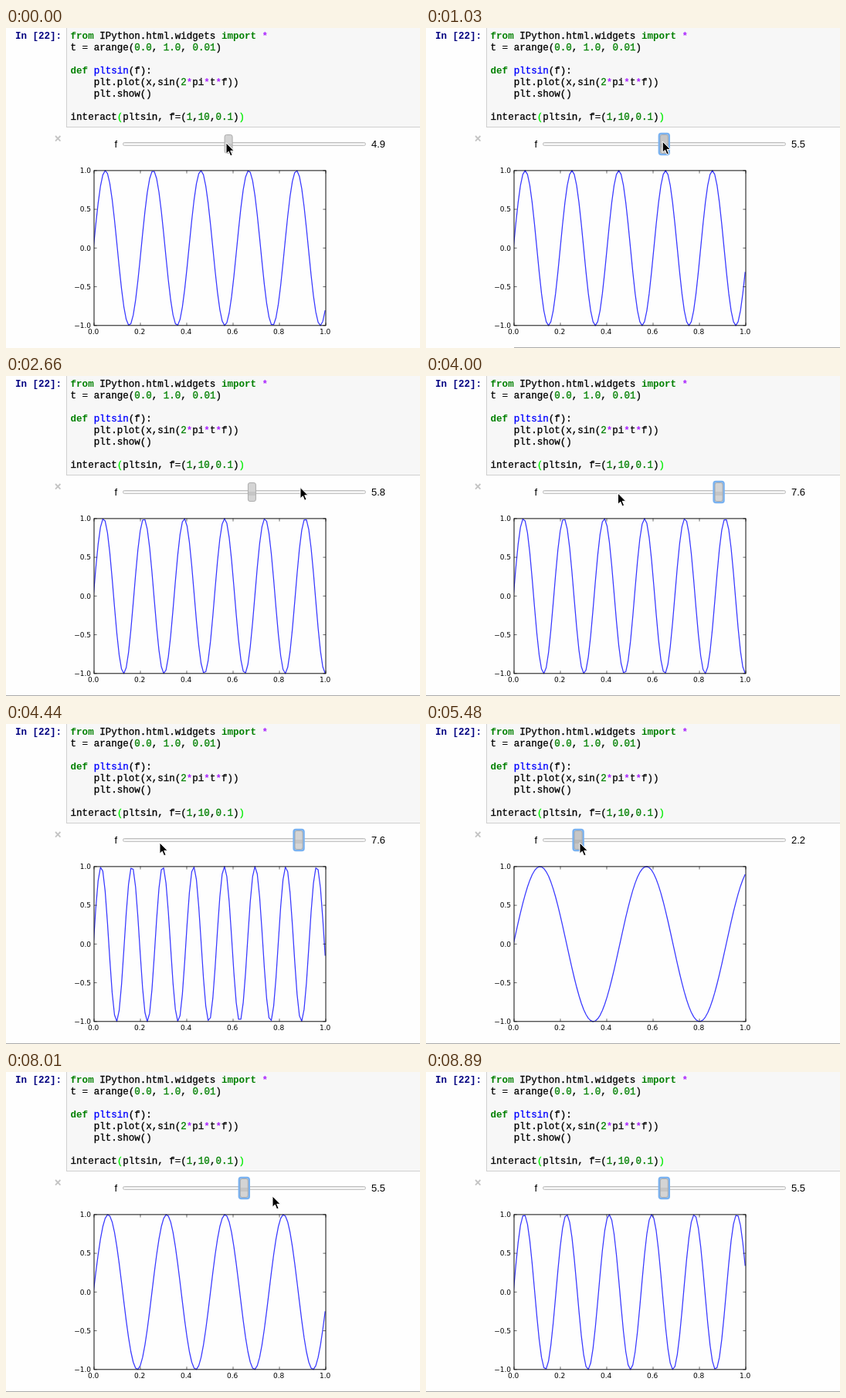
Write an HTML page that moves like this. It is 536 px wide and 415 px high and loops after 9.53 s.

```html
<!DOCTYPE html>
<html lang="en">
<head>
<meta charset="utf-8">
<title>Interactive sine plot</title>
<style>
  html, body { margin: 0; width: 100%; height: 100%; overflow: hidden; background: #fff; }
  #stage { position: relative; width: 536px; height: 415px; overflow: hidden; background: #fefefe; }
  .cell { position: absolute; left: 78px; top: -10px; width: 480px; height: 137px;
    background: #f7f7f7; border: 1px solid #cfcfcf; }
  pre { position: absolute; margin: 0; top: 4px; color: #000;
    font: 12.53px/15px "Liberation Mono", "Courier New", monospace; }
  #prompt { left: 12px; color: #000080; font-weight: bold; }
  #code { left: 83.6px; -webkit-text-stroke: .3px currentColor; }
  #code .k, #code .o { font-weight: bold; -webkit-text-stroke: 0; }
  .k { color: #008000; }
  .n { color: #008000; }
  .o { color: #a2f; }
  .d { color: #00f; }
  .b { color: #0e0; }
  svg { position: absolute; left: 0; top: 0; }
  .ui { font: 13px "Liberation Sans", Arial, sans-serif; }
  .tick { font: 9px "DejaVu Sans", sans-serif; }
</style>
</head>
<body>
<div id="stage">
  <div class="cell"></div>
  <pre id="prompt">In [22]:</pre>
  <pre id="code"><span class="k">from</span> IPython.html.widgets <span class="k">import</span> <span class="o">*</span>
t = arange(<span class="n">0.0</span>, <span class="n">1.0</span>, <span class="n">0.01</span>)

<span class="k">def</span> <span class="d">pltsin</span>(f):
    plt.plot(x,sin(<span class="n">2</span><span class="o">*</span>pi<span class="o">*</span>t<span class="o">*</span>f))
    plt.show()

interact<span class="b">(</span>pltsin, f=(<span class="n">1</span>,<span class="n">10</span>,<span class="n">0.1</span>)<span class="b">)</span></pre>
  <svg width="536" height="415" viewBox="0 0 536 415">
    <defs>
      <linearGradient id="track" x1="0" y1="0" x2="0" y2="1">
        <stop offset="0" stop-color="#e4e4e4"/><stop offset="1" stop-color="#fff"/>
      </linearGradient>
      <clipPath id="inside"><rect x="114" y="184" width="301" height="203"/></clipPath>
    </defs>
    <path d="M64 140l6.4 6.6M70.4 140l-6.4 6.6" stroke="#c4c4c4" stroke-width="1.8"/>
    <text class="ui" x="140.5" y="155">f</text>
    <text class="ui" id="value" x="473" y="155"></text>
    <rect x="151.5" y="148.5" width="314" height="4" rx="2" fill="url(#track)" stroke="#bdbdbd"/>
    <g clip-path="url(#inside)">
      <path id="curve" transform="translate(-.8)" fill="none" stroke="#3838ff" stroke-width="1.25" stroke-linejoin="round"/>
    </g>
    <g id="axes"></g>
    <path id="rule" stroke="#ababab"/>
    <g id="thumb">
      <rect id="glow" x="-6.4" y="137" width="12.8" height="27" rx="2.5" fill="#b9d7f5" stroke="#7ab2f0" stroke-width="2.6"/>
      <rect id="knob" x="-5" y="138.5" width="10" height="24" rx="2.5" stroke="#acacac"/>
      <rect x="-4.5" y="150" width="9" height="5" opacity=".07"/>
    </g>
    <path id="cursor" d="M0 0V14.2L3.3 11.2L5.6 16.8L8.1 15.7L5.7 10.3H10.2Z" stroke="#fff"/>
  </svg>
</div>
<script>
const LOOP = 9530, TICK = 148.2;
const LATENCY = 4, REDRAW = 3;    // ticks until a new value reaches the plot
const BOX = { x: 114, y: 184.9, w: 300, h: 200.9 };
const $ = id => document.getElementById(id);

// The user's actions in ticks: x, y move the pointer, f sets the slider.
const begin = { x: 285, y: 149, f: 4.9 };
const script = [
  { at: 2, len: 8, x: 319, y: 146, f: 5.8 },
  { at: 14, len: 4, x: 381, y: 144.5 },
  { at: 20, len: 1, x: 381, y: 149 },
  { at: 23, len: 1, f: 7.6 },
  { at: 25, len: 2, x: 248.5, y: 152 },
  { at: 27, len: 3, x: 199, y: 154 },
  { at: 32, len: 1, f: 2.2 },
  { at: 37, len: 7, x: 260, y: 154, f: 4 },
  { at: 45, len: 3, x: 309, y: 151 },
  { at: 50, len: 1, f: 5.5 },
  { at: 53, len: 1, x: 345, y: 161 },
  { at: 54, len: 2, x: 487, y: 325 },
  { at: 57, len: 3, x: 492, y: 440 },
];
const changes = script.filter(s => "f" in s);

function follow(prop, k) {
  let v = begin[prop];
  for (const s of script)
    if (prop in s && k > s.at) v += (s[prop] - v) * Math.min(1, (k - s.at) / s.len);
  return v;
}

const sliderValue = k => follow("f", k).toFixed(1);

// A change plots its first value after the latency, its last one once settled.
function plotted(k) {
  const s = changes.findLast(c => k > c.at + LATENCY);
  if (!s) return begin.f;
  const end = s.at + s.len;
  return sliderValue(k >= end + REDRAW ? end : s.at + 1);
}

function sinePath(f) {
  let d = "";
  for (let i = 0; i < 100; i++) {
    const x = BOX.x + BOX.w * i / 99;
    const y = BOX.y + BOX.h / 2 * (1 - Math.sin(2 * Math.PI * f * i / 100));
    d += (i ? "L" : "M") + x.toFixed(2) + " " + y.toFixed(2);
  }
  return d;
}

function drawAxes() {
  const { x, y, w, h } = BOX;
  let marks = "", labels = "";
  const label = (s, lx, ly, anchor) =>
    labels += `<text class="tick" x="${lx}" y="${ly}" text-anchor="${anchor}">${s}</text>`;
  for (let i = 0; i <= 5; i++) {
    const tx = x + w * i / 5;
    marks += `M${tx} ${y}v3.6M${tx} ${y + h}v-3.6`;
    label((i / 5).toFixed(1), tx - 0.9, 397, "middle");
  }
  for (let i = 0; i <= 4; i++) {
    const ty = y + h * i / 4;
    marks += `M${x} ${ty}h3.6M${x + w} ${ty}h-3.6`;
    label((1 - i / 2).toFixed(1).replace("-", "\u2212"), 110, ty + 3.3, "end");
  }
  $("axes").innerHTML = `<path d="${marks}" stroke="#000" stroke-width=".6"/>
    <rect x="${x}" y="${y}" width="${w}" height="${h}" fill="none" stroke="#000" stroke-width=".95"/>${labels}`;
}

function draw(k) {
  const value = sliderValue(k);
  const held = changes.some(s => k >= s.at && k <= s.at + s.len);
  const focused = k >= 1 && k < 14 || k >= 24;
  const f = plotted(k);
  $("value").textContent = value;
  $("thumb").setAttribute("transform", `translate(${197.1 + 33.7 * (value - 2.2)})`);
  $("glow").style.display = focused ? "" : "none";
  $("knob").setAttribute("fill", held ? "#c6c6c6" : "#d4d4d4");
  $("curve").setAttribute("d", sinePath(f));
  // The cell's lower edge appears in two parts with the first redraws.
  const edge = k < 7 ? 536 : k < 13 ? 114 : 0;
  $("rule").setAttribute("d", `M${edge} 414.5H536`);
  $("cursor").setAttribute("transform", `translate(${follow("x", k)} ${follow("y", k)})`);
}

const start = performance.now();
let shown = -1;
function frame() {
  const t = (performance.now() - start) % LOOP;
  const k = Math.floor((t + 15) / TICK);
  if (k !== shown) draw(shown = k);
  requestAnimationFrame(frame);
}

drawAxes();
frame();
</script>
</body>
</html>
```
